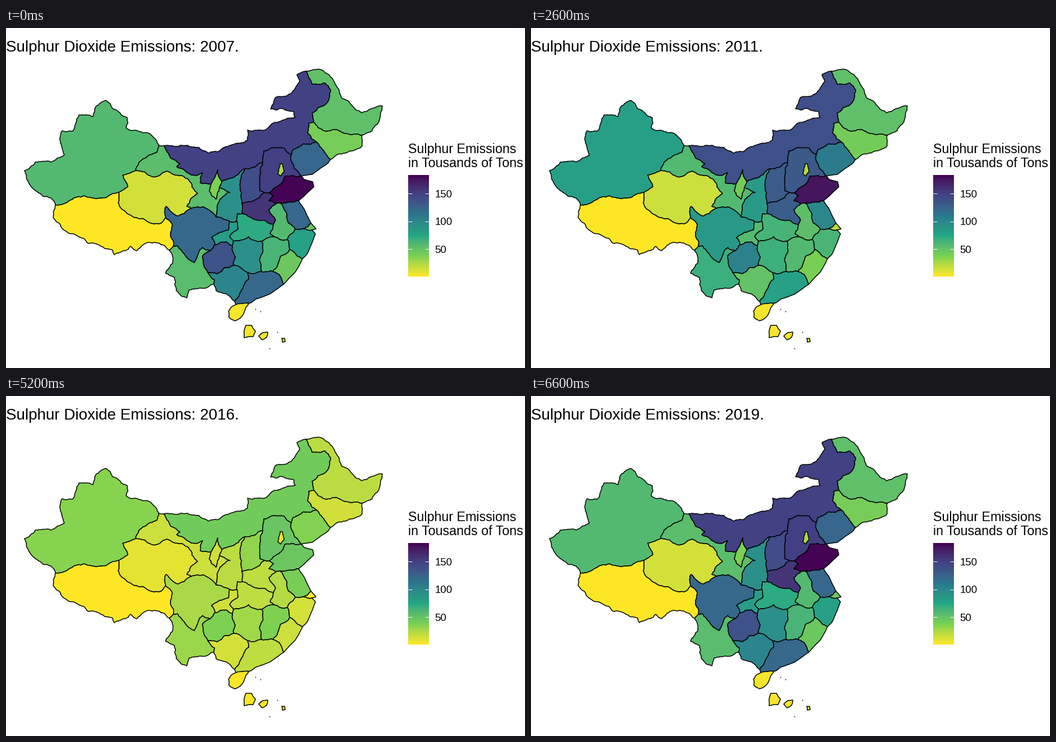
These frames come from a looping animation (924x606 px, 6670 ms). A matplotlib script:

```python
from itertools import combinations

import numpy as np
import matplotlib.pyplot as plt
from matplotlib.animation import FuncAnimation
from matplotlib.patches import Polygon

W, H, DPI = 924, 606, 96
PT = 72 / DPI
LOW, HIGH = 0.2, 182.7
plt.rcParams["font.family"] = "Liberation Sans"

# ---- colour scale: viridis stops blended in Lab ----
STOPS = ["440154", "414487", "2A788E", "22A884", "7AD151", "FDE725"]
XYZ = np.array([[0.4124, 0.3576, 0.1805],
                [0.2126, 0.7152, 0.0722],
                [0.0193, 0.1192, 0.9505]])
WHITE = XYZ.sum(axis=1)
LAB = np.array([[0, 116, 0], [500, -500, 0], [0, 200, -200]])


def to_lab(rgb):
    lin = np.where(rgb > 0.04045, ((rgb + 0.055) / 1.055) ** 2.4, rgb / 12.92)
    t = lin @ XYZ.T / WHITE
    f = np.where(t > 0.008856, np.cbrt(t), 7.787 * t + 16 / 116)
    return f @ LAB.T - [16, 0, 0]


def to_rgb(lab):
    f = (lab + [16, 0, 0]) @ np.linalg.inv(LAB).T
    t = np.where(f > 0.2069, f ** 3, (f - 16 / 116) / 7.787)
    lin = np.clip((t * WHITE) @ np.linalg.inv(XYZ).T, 0, 1)
    return np.where(lin > 0.0031308, 1.055 * lin ** (1 / 2.4) - 0.055, 12.92 * lin)


STOP_LAB = to_lab(np.array([[int(s[i:i + 2], 16) / 255 for i in (0, 2, 4)]
                            for s in STOPS]))


def shade(values):
    t = (HIGH - np.asarray(values, float)) / (HIGH - LOW)
    knots = np.linspace(0, 1, len(STOPS))
    lab = np.stack([np.interp(t, knots, c) for c in STOP_LAB.T], axis=-1)
    return np.clip(to_rgb(lab), 0, 1)


# ---- emissions: levels at 2007, 2012 and 2017, decaying within each era ----
levels = {}


def region(code, *level):
    levels[code] = level


region("XJ", 58, 80, 34)
region("XZ", 0, 0, 0)
region("QH", 13, 15, 8)
region("GS", 54, 58, 15)
region("IM", 148, 139, 42)
region("NX", 37, 41, 14)
region("SN", 92, 84, 20)
region("SX", 140, 130, 31)
region("HE", 149, 132, 47)
region("LN", 122, 107, 35)
region("JL", 40, 41, 14)
region("HL", 52, 52, 20)
region("SD", 182, 175, 46)
region("HA", 156, 129, 19)
region("JS", 122, 98, 39)
region("AH", 58, 53, 22)
region("SH", 47, 22, 1)
region("ZJ", 79, 62, 13)
region("FJ", 45, 38, 15)
region("JX", 62, 58, 36)
region("HB", 71, 63, 19)
region("HN", 91, 66, 27)
region("GD", 121, 79, 19)
region("GX", 100, 50, 13)
region("GZ", 137, 102, 36)
region("YN", 55, 67, 29)
region("SC", 121, 85, 25)
region("CQ", 82, 57, 14)
region("HI", 3, 3, 1)
region("TJ", 25, 22, 3)


def emission(level, year):
    era = (year >= 2011) + (year >= 2016)
    decay = 0.85 if era == 2 else 0.95
    return level[era] * decay ** (year - 2007 - 5 * era)


# ---- map: junctions where regions meet ("--" is outside), bends between ----
junctions, bends = [], {}


def meet(codes, x, y):
    junctions.append((set(codes.split()), np.array([x, y], float)))


def bend(codes, *pts):
    bends[frozenset(codes.split())] = [np.array(p, float) for p in pts]


meet("XJ XZ --", 88, 316)
meet("XJ GS --", 272, 209)
meet("XJ GS QH", 231, 254)
meet("XJ QH XZ", 201, 293)
meet("XZ YN --", 291, 396)
meet("XZ YN SC", 298, 389)
meet("XZ QH SC", 284, 338)
meet("QH SC GS", 317, 331)
meet("GS IM --", 281, 210)
meet("GS IM NX", 365, 278)
meet("GS NX SN", 380, 284)
meet("GS SN SC", 374, 337)
meet("NX IM SN", 384, 274)
meet("HL IM --", 534, 77)
meet("HL JL --", 634, 191)
meet("HL JL IM", 548, 168)
meet("JL LN IM", 553, 203)
meet("JL LN --", 578, 234)
meet("LN IM HE", 508, 226)
meet("LN HE SD --", 526, 264)
meet("HE IM SX", 457, 240)
meet("SX IM SN", 425, 251)
meet("SX HE HA", 460, 293)
meet("SN SX HA", 420, 313)
meet("HE HA SD", 469, 294)
meet("SD JS --", 521, 308)
meet("SN HA HB", 421, 331)
meet("HA HB AH", 476, 350)
meet("HA SD AH", 481, 313)
meet("AH SD JS", 488, 312)
meet("AH JS ZJ", 515, 359)
meet("JS SH --", 543, 348)
meet("JS SH ZJ", 529, 358)
meet("SH ZJ --", 545, 360)
meet("AH ZJ JX", 501, 377)
meet("AH JX HB", 477, 372)
meet("SN SC CQ", 398, 345)
meet("SN CQ HB", 411, 345)
meet("HB CQ HN", 405, 380)
meet("HB HN JX", 456, 380)
meet("ZJ JX FJ", 505, 395)
meet("ZJ FJ --", 528, 411)
meet("FJ JX GD", 475, 434)
meet("FJ GD --", 494, 457)
meet("JX GD HN", 455, 434)
meet("HN CQ GZ", 403, 388)
meet("HN GZ GX", 405, 423)
meet("HN GX GD", 430, 436)
meet("SC CQ GZ", 372, 386)
meet("SC GZ YN", 364, 397)
meet("GZ YN GX", 359, 436)
meet("YN GX --", 370, 456)
meet("GX GD --", 407, 487)

# outer edge
bend("XJ --", (80, 303), (66, 300), (45, 283), (33, 254), (52, 239), (80, 239),
     (104, 226), (100, 183), (118, 184), (130, 155), (155, 158), (160, 140),
     (178, 129), (190, 144), (216, 160), (214, 178), (260, 192))
bend("XZ --", (84, 338), (103, 360), (147, 384), (166, 387), (190, 396),
     (193, 404), (212, 397), (222, 389), (233, 397), (245, 386), (265, 382))
bend("IM --", (361, 223), (390, 212), (430, 200), (430, 182), (463, 181),
     (497, 163), (515, 159), (512, 149), (471, 144), (481, 123), (500, 121),
     (523, 95), (518, 83))
bend("HL --", (552, 74), (575, 83), (597, 124), (633, 151), (670, 139),
     (664, 167), (652, 183))
bend("JL --", (634, 210), (605, 223))
bend("LN --", (573, 241), (545, 261))
bend("SD --", (531, 270), (546, 274), (548, 283))
bend("JS --", (531, 323))
bend("SH --", (552, 358))
bend("ZJ --", (551, 367), (536, 403))
bend("FJ --", (515, 435))
bend("GD --", (409, 493), (436, 490), (445, 483), (470, 474))
bend("GX --", (374, 468), (398, 478))
bend("YN --", (297, 418), (284, 437), (300, 445), (303, 468), (322, 481),
     (326, 467))

# west
bend("XJ GS", (268, 222), (237, 239))
bend("XJ QH", (208, 262), (217, 283))
bend("XJ XZ", (150, 302), (127, 301))
bend("XZ SC", (296, 350))
bend("XZ QH", (200, 312), (215, 330), (272, 349))
bend("QH SC", (285, 318), (307, 335))
bend("QH GS", (260, 265), (287, 255), (325, 270), (341, 295), (322, 318), (331, 322))
bend("GS IM", (293, 232), (310, 242), (304, 247), (330, 262), (350, 258), (346, 276))
bend("GS NX", (362, 290), (374, 305))
bend("GS SN", (399, 293), (378, 312))
bend("GS SC", (331, 321), (352, 319))
bend("NX IM", (377, 253))

# north
bend("HL IM", (545, 100), (568, 98), (578, 110), (568, 137), (545, 152))
bend("HL JL", (566, 183), (605, 188))
bend("JL IM", (537, 187), (539, 170))
bend("LN IM", (510, 218))
bend("HE LN", (507, 234))
bend("HE IM", (459, 219), (495, 214))
bend("SX HE", (452, 262), (452, 290))
bend("SN SX", (417, 275))
bend("SN IM", (400, 268))
bend("SX HA", (452, 302))
bend("HE SD", (497, 264))

# centre and south
bend("HA SD", (476, 299), (468, 308))
bend("HA AH", (468, 324), (480, 342))
bend("SN HB", (412, 331))
bend("AH JS", (500, 332), (503, 348))
bend("AH HB", (470, 367))
bend("HB CQ", (413, 358), (398, 372))
bend("HB HN", (440, 378), (432, 372))
bend("ZJ FJ", (517, 405))
bend("FJ JX", (488, 408))
bend("FJ GD", (486, 439))
bend("JX HN", (451, 412), (457, 400))
bend("HN GZ", (408, 408))
bend("SC CQ", (396, 360), (366, 374))
bend("CQ GZ", (392, 381))
bend("SC YN", (305, 388), (335, 418), (343, 400), (350, 391))
bend("GZ YN", (350, 406), (354, 428))
bend("GZ GX", (376, 438))
bend("YN GX", (371, 449))
bend("GX GD", (432, 448), (416, 473))

rng = np.random.RandomState(7)
COAST = {"LN", "SD", "JS", "SH", "ZJ", "FJ", "GD"}


def ragged(a, b, rough):
    """Midpoint displacement from a up to, not including, b."""
    dx, dy = b - a
    if np.hypot(dx, dy) < 5:
        return [a]
    mid = (a + b) / 2 + rng.uniform(-rough, rough) * np.array([-dy, dx])
    return ragged(a, mid, rough) + ragged(mid, b, rough)


def trace(pts, rough):
    pts = [np.array(p, float) for p in pts]
    line = [p for a, b in zip(pts, pts[1:]) for p in ragged(a, b, rough)]
    return np.array(line + [pts[-1]])


def span(p, q):
    return np.hypot(*(p - q))


def find_borders():
    """Two regions that share two junctions share the line between them."""
    found = []
    for pair in combinations([*levels, "--"], 2):
        ends = [pos for codes, pos in junctions if codes.issuperset(pair)]
        if len(ends) != 2:
            continue
        a, b = ends
        via = bends.get(frozenset(pair), [])
        if via and span(a, via[0]) + span(b, via[-1]) > span(b, via[0]) + span(a, via[-1]):
            a, b = b, a
        smooth = pair[1] == "--" and pair[0] in COAST
        found.append((pair, trace([a, *via, b], 0.02 if smooth else 0.12)))
    return found


borders = find_borders()


def ring(code):
    """Chain all borders of a region into one closed outline."""
    parts = [line for pair, line in borders if code in pair]
    path = parts.pop(0)
    while parts:
        options = [(span(line[::step][0], path[-1]), i, step)
                   for i, line in enumerate(parts) for step in (1, -1)]
        _, i, step = min(options)
        path = np.vstack([path, parts.pop(i)[::step]])
    return path


# ---- stage ----
fig = plt.figure(figsize=(W / DPI, H / DPI), dpi=DPI, facecolor="white")
ax = fig.add_axes([0, 0, 1, 1])


def add_shape(pts):
    patch = Polygon(pts, closed=True, edgecolor="black", linewidth=1.5 * PT,
                    joinstyle="round")
    return ax.add_patch(patch)


def add_blob(*pts):
    return add_shape(trace([*pts, pts[0]], 0.08))


def label(x, y, text, size):
    return ax.text(x, y, text, fontsize=size * PT, color="black", va="baseline")


shapes = {code: add_shape(ring(code)) for code in levels
          if code not in ("HI", "TJ")}
shapes["HI"] = add_blob((432, 491), (417, 517), (407, 522), (397, 516),
                        (396, 505), (403, 496))
shapes["TJ"] = add_blob((488, 242), (492, 242), (495, 256), (489, 264),
                        (484, 260), (486, 250))
islets = [add_blob((427, 530), (437, 530), (444, 540), (440, 550), (424, 552)),
          add_blob((450, 549), (457, 543), (466, 542), (464, 551), (456, 556)),
          add_blob((491, 553), (496, 553), (497, 559), (492, 560))]
for x, y in [(444, 501), (453, 505), (483, 542), (469, 571)]:
    ax.plot(x, y, "s", color="black", markersize=1.6 * PT, markeredgewidth=0)

TOP, BOTTOM, LEFT, RIGHT = 262, 443, 716, 753
ramp = shade(np.linspace(HIGH, LOW, BOTTOM - TOP))[:, None, :]
ax.imshow(ramp, extent=[LEFT, RIGHT, BOTTOM, TOP], aspect="auto",
          interpolation="nearest")
for value in (150, 100, 50):
    y = TOP + (HIGH - value) / (HIGH - LOW) * (BOTTOM - TOP) + 0.5
    for x in (LEFT, RIGHT - 7.4):
        ax.plot([x, x + 7.4], [y, y], color="white", lw=PT, solid_capstyle="butt")
    label(763.5, y + 6.7, str(value), 18.6)
label(715.5, 223.5, "Sulphur Emissions", 23.2)
label(715.5, 248.5, "in Tousands of Tons", 23.2)
title = label(0, 42.5, "", 27.8)

ax.set_xlim(0, W)
ax.set_ylim(H, 0)
ax.axis("off")

# ---- motion: colours switch one beat ahead of the year ----
FRAMES, INTERVAL = 230, 29
BEAT = 200 / 3
HOLDS = [8] * 6 + [7] + [8] * 3 + [7] * 3
SWITCHES = np.cumsum(HOLDS) * BEAT
FIRST, YEARS = 2007, len(HOLDS)
COLOURS = [shade([emission(levels[code], FIRST + k) for code in shapes])
           for k in range(YEARS)]


def passed(ms):
    return int(np.sum(ms >= SWITCHES))


def draw(frame):
    ms = (frame + 1) * INTERVAL - 1
    year = FIRST + min(passed(ms), YEARS - 1)
    title.set_text(f"Sulphur Dioxide Emissions: {year}.")
    colours = COLOURS[passed(ms + BEAT) % YEARS]
    for shape, colour in zip(shapes.values(), colours):
        shape.set_facecolor(colour)
    for islet in islets:
        islet.set_facecolor(shapes["HI"].get_facecolor())
    return [title, *shapes.values(), *islets]


anim = FuncAnimation(fig, draw, frames=FRAMES, interval=INTERVAL, repeat=True,
                     repeat_delay=0, blit=False)
plt.show()
```
